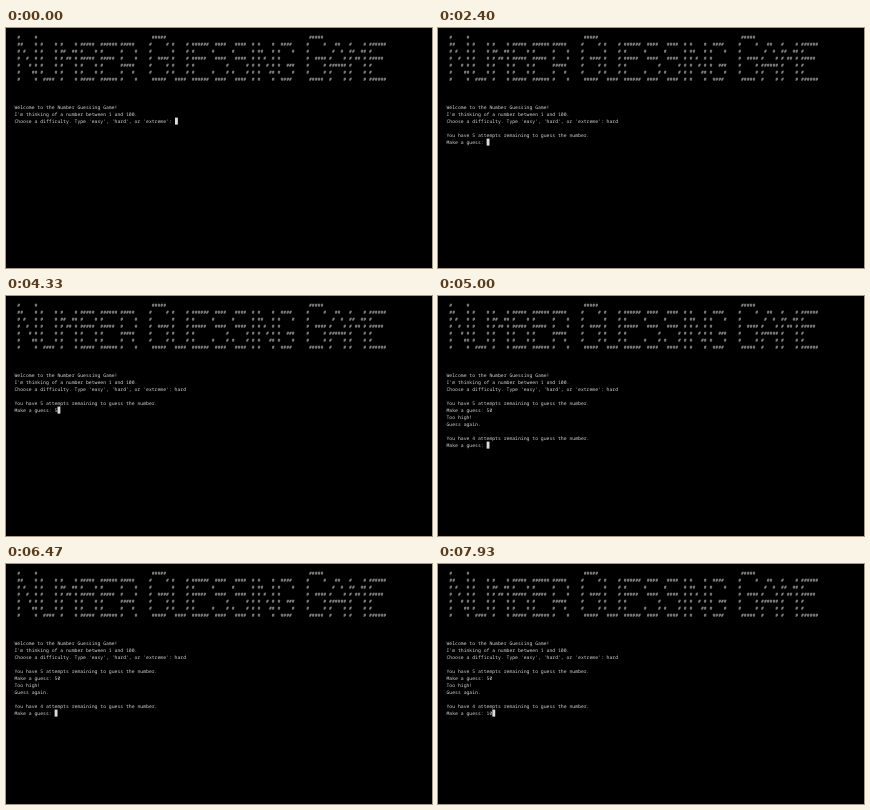
An HTML page that plays this animation: 426 px wide and 240 px high, repeating every 8000 ms.

```html
<!DOCTYPE html>
<html lang="en">
<head>
<meta charset="utf-8">
<title>Number guessing game</title>
<style>
  html, body { margin: 0; width: 100%; height: 100%; overflow: hidden; background: #000; }
  svg { display: block; width: 100vw; height: 100vh; }
  text {
    font: 4.777px "Noto Sans Mono", "DejaVu Sans Mono", monospace;
    fill: #d4d4d4;
    white-space: pre;
    text-rendering: geometricPrecision;
    font-variant-ligatures: none;
  }
</style>
</head>
<body>
<svg viewBox="0 0 426 240" id="stage"></svg>
<script>
const NS = "http://www.w3.org/2000/svg";
const LOOP = 8000;
const LEFT = 8.5, TOP = 5.6, COL = 2.866, ROW = 7, BASELINE = 5.4;
const BLINK = 533;
const stage = document.getElementById("stage");

// Banner letters, one row per "/"; lowercase starts one row down.
const GLYPHS = {
  N: "#     #/##    #/# #   #/#  #  #/#   # #/#    ##/#     #",
  G: " ##### /#     #/#      /#  ####/#     #/#     #/ ##### ",
  u: "      /#    #/#    #/#    #/#    #/#    #/ #### ",
  m: "      /#    #/##  ##/# ## #/#    #/#    #/#    #",
  b: "      /##### /#    #/##### /#    #/#    #/##### ",
  e: "      /######/#     /##### /#     /#     /######",
  r: "      /##### /#    #/#    #/##### /#   # /#    #",
  s: "      / #### /#     / #### /     #/#    #/ #### ",
  i: " /#/#/#/#/#/#",
  n: "      /#    #/##   #/# #  #/#  # #/#   ##/#    #",
  g: "      / #### /#    #/#     /#  ###/#    #/ #### ",
  a: "      /  ##  / #  # /#    #/######/#    #/#    #",
  " ": "  /  /  /  /  /  /  "
};

function bannerRow(row) {
  return [..."Number Guessing Game"].map(c => " " + GLYPHS[c].split("/")[row]).join("");
}

const choose = "Choose a difficulty. Type 'easy', 'hard', or 'extreme': ";
const guess = "Make a guess: ";
const attempts = n => `You have ${n} attempts remaining to guess the number.`;

// [time, row, text]: each entry replaces that row from its time on.
const script = [
  ...Array.from({ length: 7 }, (_, row) => [0, row, bannerRow(row)]),
  [0, 10, "Welcome to the Number Guessing Game!"],
  [0, 11, "I'm thinking of a number between 1 and 100."],
  [0, 12, choose],
  [1730, 12, choose + "h"],
  [1865, 12, choose + "ha"],
  [1930, 12, choose + "har"],
  [2065, 12, choose + "hard"],
  [2265, 14, attempts(5)],
  [2265, 15, guess],
  [4330, 15, guess + "5"],
  [4530, 15, guess + "50"],
  [4930, 16, "Too high!"],
  [4930, 17, "Guess again."],
  [4930, 19, attempts(4)],
  [4930, 20, guess],
  [7600, 20, guess + "1"],
  [7800, 20, guess + "10"]
];

// Moments at which the cursor starts a fresh visible phase.
const wakes = [-466, 530, 1597, 1730, 1865, 1930, 2065, 2197, 3197,
               4330, 4530, 4928, 7600, 7800];

function add(name, attrs) {
  const node = document.createElementNS(NS, name);
  for (const key in attrs) node.setAttribute(key, attrs[key]);
  return stage.appendChild(node);
}

const lines = Array.from({ length: 21 }, (_, row) =>
  add("text", { x: LEFT, y: TOP + row * ROW + BASELINE }));
const cursor = add("rect", { width: COL, height: ROW, fill: "#dcdcdc" });

function draw(time) {
  const rows = Array(21).fill("");
  let last = 0;
  for (const [at, row, text] of script) {
    if (at > time) break;
    rows[row] = text;
    last = row;
  }
  rows.forEach((text, row) => {
    if (lines[row].textContent !== text) lines[row].textContent = text;
  });
  const wake = wakes.filter(w => w <= time).pop();
  const lit = Math.floor((time - wake) / BLINK) % 2 === 0;
  cursor.setAttribute("x", LEFT + rows[last].length * COL);
  cursor.setAttribute("y", TOP + last * ROW);
  cursor.setAttribute("visibility", lit ? "visible" : "hidden");
}

const start = performance.now();
function tick() {
  draw((performance.now() - start) % LOOP);
  requestAnimationFrame(tick);
}
tick();
</script>
</body>
</html>
```
